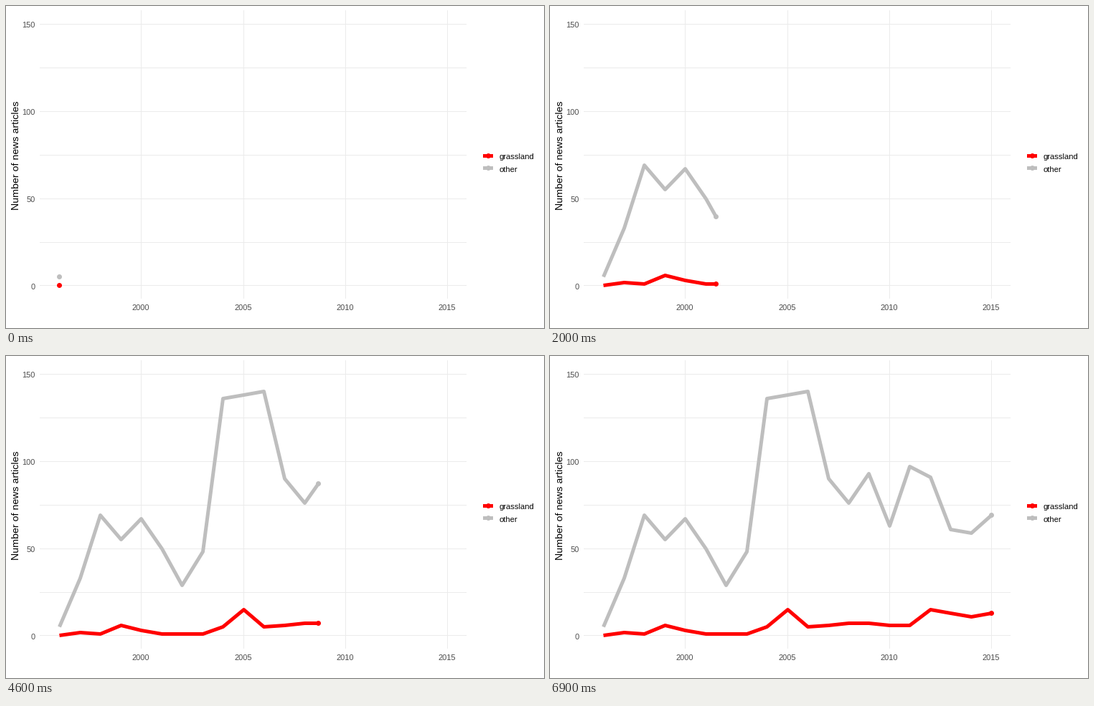
Recreate the animation shown at these times as a matplotlib script. Size 750 px wide and 450 px high, loop 10 s.

```python
import matplotlib.pyplot as plt
import numpy as np
from matplotlib.animation import FuncAnimation
from matplotlib.patches import Circle

plt.rcParams.update({
    "font.family": "Liberation Sans",
    "text.hinting": "native",
    "path.snap": False,
    "path.simplify": False,
    "toolbar": "None",
})

W, H, DPI = 750, 450, 100
PT = 72 / DPI                      # points per pixel
FRAMES, LAST = 100, 69             # the chart is complete at LAST, then holds
RED, GREY = "#ff0000", "#bebebe"
GRID, TICK = "#ebebeb", "#4d4d4d"
LEFT, RIGHT, TOP, BOTTOM = 47, 642, 6, 409

GRASSLAND = [0, 2, 1, 6, 3, 1, 1, 1, 5, 15, 5, 6, 7, 7, 6, 6, 15, 13, 11, 13]
OTHER = [5, 33, 69, 55, 67, 50, 29, 48, 136, 138, 140, 90, 76, 93, 63, 97,
         91, 61, 59, 69]
YEARS = np.arange(1996, 2016)
# every year is reached on a whole frame
KEYS = np.round(LAST * (YEARS - 1996) / 19)


def px(year):
    return np.floor(74.35 + 28.47 * (np.asarray(year) - 1996) + 0.5) + 0.5


def py(value):
    return np.floor(390.45 - 2.437 * np.asarray(value) + 0.5) + 0.5


fig = plt.figure(figsize=(W / DPI, H / DPI), dpi=DPI, facecolor="white")
ax = fig.add_axes([0, 0, 1, 1])
ax.set_xlim(0, W)
ax.set_ylim(H, 0)
ax.axis("off")


def stroke(xs, ys, color, width, z):
    line, = ax.plot(xs, ys, color=color, lw=width * PT, zorder=z,
                    solid_capstyle="butt", solid_joinstyle="round")
    return line


def dot(x, y, color):
    return ax.add_patch(Circle((x, y), 3.5, fc=color, ec="none", lw=0,
                               zorder=4))


def label(x, y, text, size=11, color="black", ha="left", **kw):
    ax.text(x, y, text, fontsize=size * PT, color=color, ha=ha,
            va="baseline", **kw)


for value in range(0, 151, 25):
    y = float(py(value))
    stroke([LEFT, RIGHT], [y, y], GRID, 1, 1)
    if value % 50 == 0:
        label(41, y + 5, str(value), color=TICK, ha="right")

for year in range(2000, 2016, 5):
    x = float(px(year))
    stroke([x, x], [TOP, BOTTOM], GRID, 1, 1)
    label(x - 1, 425, str(year), color=TICK, ha="center")

label(18, 208.5, "Number of news articles", size=14.25, ha="center",
      rotation=90, rotation_mode="anchor")

for name, color, y, base in (("grassland", RED, 209.5, 214),
                             ("other", GREY, 226.5, 232)):
    stroke([665, 679], [y, y], color, 5, 3)
    dot(672.5, y, color)
    label(688, base, name, size=11.2)

series = [(np.array(data), stroke([], [], color, 5, 3), dot(0, 0, color))
          for data, color in ((OTHER, GREY), (GRASSLAND, RED))]


def draw(frame):
    now = min(frame, LAST)
    year = np.interp(now, KEYS, YEARS)
    done = YEARS < year
    for data, line, head in series:
        value = np.interp(year, YEARS, data)
        xs = px(np.append(YEARS[done], year))
        ys = py(np.append(data[done], value))
        line.set_data(xs, ys)
        head.center = xs[-1], ys[-1]
    return [artist for _, line, head in series for artist in (line, head)]


anim = FuncAnimation(fig, draw, frames=FRAMES, interval=100,
                     init_func=lambda: draw(0), repeat=True, repeat_delay=0)
plt.show()
```
